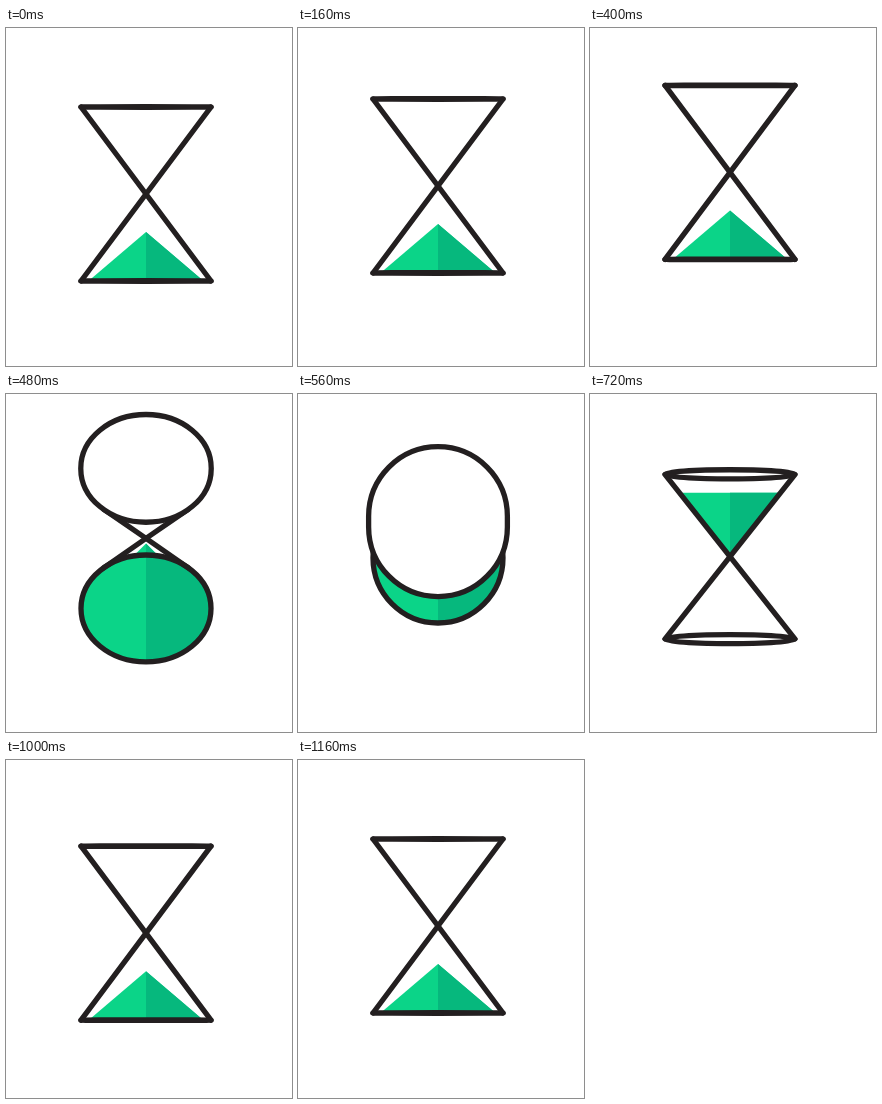
An HTML page with a canvas for the animation above (1480 ms loop, 286x338 px).

```html
<!DOCTYPE html>
<html lang="en">
<head>
<meta charset="utf-8">
<title>Hourglass</title>
<style>
html, body { margin: 0; width: 100%; height: 100%; overflow: hidden; background: #fff; }
canvas { display: block; width: 286px; height: 338px; }
</style>
</head>
<body>
<canvas id="stage" width="286" height="338"></canvas>
<script>
const LOOP = 1480, STEP = 40, CX = 140, R = 65, HALF = 87;
const FLIP_START = 410, FLIP_TIME = 346, FLIP_MID = FLIP_START + FLIP_TIME / 2;
const INK = '#231f20', LIGHT = '#0bd488', DARK = '#06b87d';
const ctx = document.getElementById('stage').getContext('2d');

const clamp = x => Math.min(1, Math.max(0, x));
const span = (t, from, to) => clamp((t - from) / (to - from));
const smooth = (t, from, to) => {
  const x = span(t, from, to);
  return x * x * (3 - 2 * x);
};

// Slow lift, drop past the rest height, then settle.
const waistAt = t => 166 - 21.6 * span(t, 40, 400) ** 0.9
  + 33.4 * smooth(t, 515, 900) - 11.8 * smooth(t, 880, 1160);

// Rims open quickly into circles and close again more slowly.
const openingAt = t => smooth(t, 400, 510) * (1 - smooth(t, 580, 746));

function triangle(tipY, baseY, half) {
  const p = new Path2D();
  p.moveTo(CX, tipY);
  p.lineTo(CX + half, baseY);
  p.lineTo(CX - half, baseY);
  p.closePath();
  return p;
}

function disc(y, rx, ry, side = 0) {
  const p = new Path2D();
  p.ellipse(CX, y - side, rx, ry, 0, Math.PI, 2 * Math.PI);
  p.ellipse(CX, y + side, rx, ry, 0, 0, Math.PI);
  p.closePath();
  return p;
}

function fillSand(...paths) {
  ctx.fillStyle = LIGHT;
  paths.forEach(p => ctx.fill(p));
  ctx.save();
  ctx.beginPath();
  ctx.rect(CX, 0, 146, 338);
  ctx.clip();
  ctx.fillStyle = DARK;
  paths.forEach(p => ctx.fill(p));
  ctx.restore();
}

// Two lines from the waist, touching the rim.
function sides(y, d, rx, ry) {
  const k = ry / Math.abs(d);
  if (k >= 1) return;
  const x = rx * Math.sqrt(1 - k * k), rimY = y + d * (1 - k * k);
  ctx.beginPath();
  ctx.moveTo(CX - x, rimY);
  ctx.lineTo(CX, y);
  ctx.lineTo(CX + x, rimY);
  ctx.stroke();
}

function tippedSand(t, y, d, b) {
  const spread = smooth(t, 400, 480), half = 57.5 + 7.5 * spread;
  const height = Math.min(49 + 16 * spread, d);
  fillSand(triangle(y + d - height, y + d, half), disc(y + d, half, b));
}

function runningSand(t, y, d, b) {
  const level = Math.min(0.8, (911 - t) / 246);
  if (level > 0) {
    const top = y + d * level;
    fillSand(triangle(y, top, R * level), disc(top, R * level, Math.max(0, b - 5) * level));
  }
  const height = 49 * (1 - (1 - span(t, 740, 1000)) ** 3);
  if (height > 0) {
    const base = y + HALF, from = y + 48 * smooth(t, 911, 1000);
    ctx.fillStyle = LIGHT;
    ctx.fillRect(CX - 2.5, from, 5, Math.max(0, base - height + 3 - from));
    fillSand(triangle(base - height, base, R - 7.5 * smooth(t, 840, 1000)));
  }
}

function draw(t) {
  const angle = Math.PI * span(t, FLIP_START, FLIP_START + FLIP_TIME);
  const y = waistAt(t), d = HALF * Math.cos(angle);
  const b = 0.3 + R * openingAt(t);
  const nearR = R + 5 * Math.sin(angle) ** 6, nearB = b * nearR / R;

  ctx.fillStyle = '#fff';
  ctx.fillRect(0, 0, 286, 338);
  ctx.strokeStyle = INK;
  ctx.lineWidth = 5.3;
  ctx.lineCap = ctx.lineJoin = 'round';

  (t < FLIP_MID ? tippedSand : runningSand)(t, y, d, b);
  sides(y, d, R, b);
  ctx.stroke(disc(y + d, R, b));

  sides(y, -d, nearR, nearB);
  const near = disc(y - d, nearR, nearB, (nearR - R) * 1.2);
  ctx.fillStyle = '#fff';
  ctx.fill(near);
  ctx.stroke(near);
}

function tick() {
  const t = performance.now() % LOOP;
  draw(Math.floor(t / STEP) * STEP);
  requestAnimationFrame(tick);
}
tick();
</script>
</body>
</html>
```
